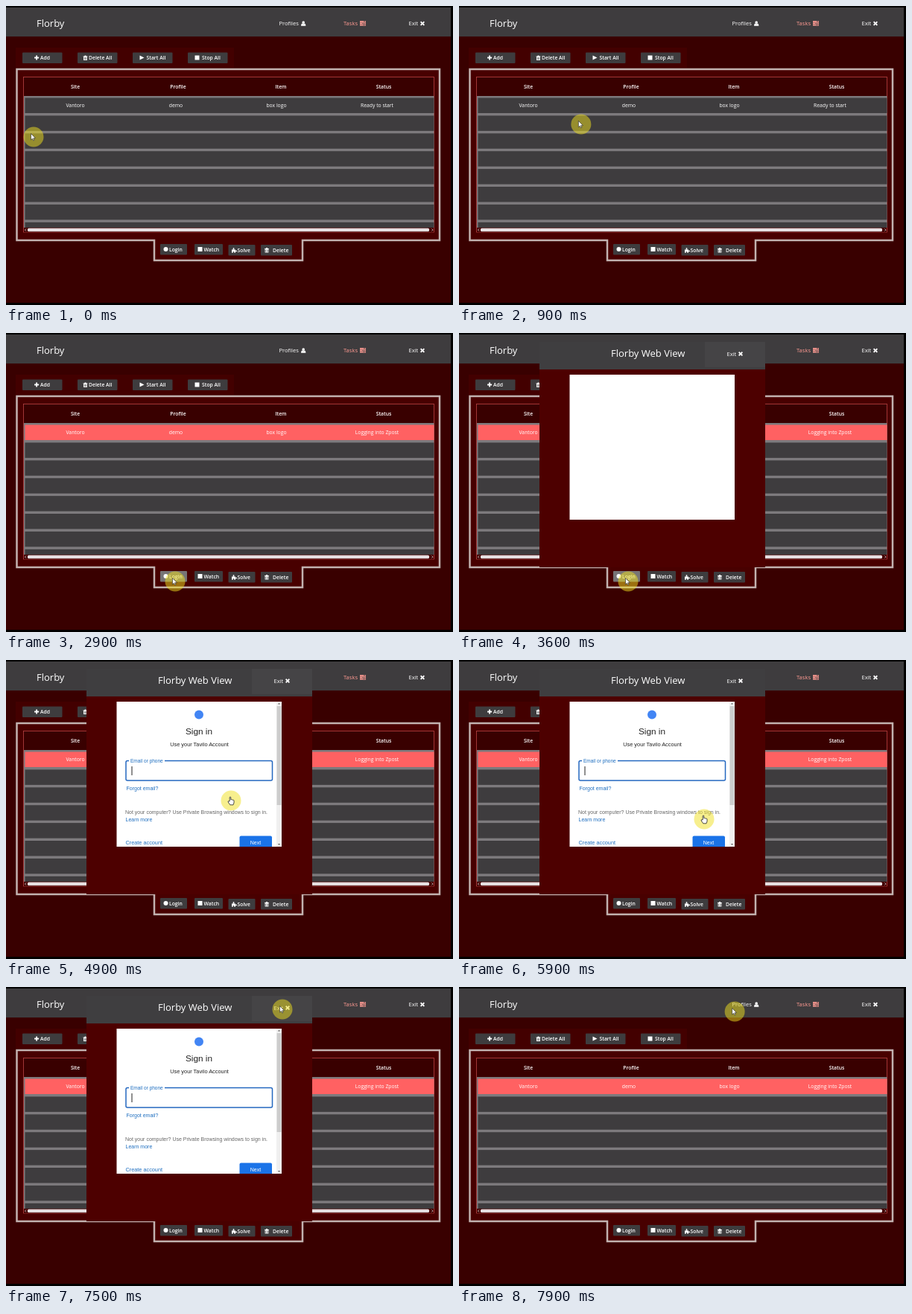
An HTML page that plays this animation: 600 px wide and 402 px high, repeating every 8000 ms.

```html
<!DOCTYPE html>
<html lang="en">
<head>
<meta charset="utf-8">
<style>
html, body { margin: 0; width: 100%; height: 100%; overflow: hidden; background: #000; }
svg { display: block; width: 600px; height: 402px; }
text { font: 6.8px "Open Sans", "Noto Sans", sans-serif; fill: #fff; }
.bold { font-weight: 600; }
.nav { font-size: 7.6px; font-weight: 500; }
.title { font-size: 13px; font-weight: 500; }
.mid { text-anchor: middle; }
#page text { font: 7px "Liberation Sans", Arial, sans-serif; fill: #1f6fc0; }
#page .ink { fill: #222; }
</style>
</head>
<body>
<svg id="stage" viewBox="0 0 600 402">
  <defs>
    <path id="plus" d="M2.2 0h1.8v2.1h2.1v1.8H4V6H2.2V3.9H.1V2.1h2.1z"/>
    <path id="cross" d="M1.3 0 3 1.7 4.7 0 6 1.3 4.3 3 6 4.7 4.7 6 3 4.3 1.3 6 0 4.7 1.7 3 0 1.3z"/>
    <path id="trash" fill-rule="evenodd" d="M0 1h1.7L2.2 0h1.6l.5 1H6v.8h-.6V6.5H.6V1.8H0zM1.5 2.5v3.2h.5V2.5zm1.3 0v3.2h.5V2.5zm1.3 0v3.2h.5V2.5z"/>
    <path id="play" d="M0 0 6 3 0 6z"/>
    <path id="square" d="M0 0h6v6H0z"/>
    <path id="dot" d="M0 3a3 3 0 0 1 6 0a3 3 0 0 1-6 0"/>
    <path id="user" d="M1.4 2a1.8 1.8 0 1 1 3.6 0a1.8 2 0 1 1-3.6 0M0 6.8Q0 3.8 1.4 3.6Q3.2 5 5 3.6Q6.4 3.8 6.4 6.8z"/>
    <path id="list" fill-rule="evenodd" d="M0 0h8v1.8H0zM0 2.3h8v1.8H0zM0 4.6h8v1.8H0zM5 .6v.6h2.3V.6zM3 2.9v.6h4.3v-.6zM4 5.2v.6h3.3v-.6z"/>
    <path id="puzzle" d="M0 2.5h1.8Q1 0 2.5 0T3.2 2.5H5V4q2-1 2 .4T5 5v1.7H3.3Q3.6 5 2.5 5T1.8 6.7H0z"/>
  </defs>
  <g id="app"></g>
  <g id="popup">
    <path fill="#4d0000" d="M108 12h303v303H108z"/>
    <path fill="#3f3e40" d="M108 12h303v37H108z"/>
    <path id="exitHover" fill="#454446" d="M330 12h81v34h-81z"/>
    <text class="title" x="204" y="32">Florby Web View</text>
    <text class="nav" x="359.5" y="31">Exit</text>
    <use href="#cross" fill="#fff" x="375" y="25"/>
    <path fill="#fff" d="M148.500 56h221.500v195H148.500z"/>
    <g id="page">
      <circle cx="259" cy="73.500" r="6" fill="#4285f4"/>
      <text class="ink mid" x="259" y="100" style="font-size:11.8px">Sign in</text>
      <text class="ink mid" x="259.500" y="115.500" style="font-size:7.4px">Use your Tavilo Account</text>
      <rect x="161" y="135.500" width="196.500" height="26.500" rx="2" fill="none" stroke="#2468c0" stroke-width="1.500"/>
      <path fill="#fff" d="M165 133h48v5h-48z"/>
      <text x="167" y="137.500" style="font-size:6.5px">Email or phone</text>
      <path fill="#222" d="M168.500 143h1v12h-1z"/>
      <text x="161.500" y="174.500">Forgot email?</text>
      <text x="160" y="206.500" style="fill:#666">Not your computer? Use Private Browsing windows to sign in.</text>
      <text x="160.500" y="216.500">Learn more</text>
      <text x="160.500" y="247.500" style="font-size:7.3px">Create account</text>
      <path fill="#1a73e8" d="M313.500 251v-12.500q0-2 2-2h39.500q2 0 2 2V251z"/>
      <text class="mid" x="335" y="247.500" style="fill:#fff">Next</text>
      <path fill="#f0f0f0" d="M363 56h7v195h-7z"/>
      <path fill="#cdcdcd" d="M363.500 62h6v133h-6z"/>
      <path fill="#666" d="M365 59.500l1.500-2 1.500 2zM365 247l1.500 2 1.500-2z"/>
    </g>
  </g>
  <g id="pointer">
    <circle r="13.500" fill="#efdf1e" fill-opacity=".5"/>
    <path id="arrow" fill="#fff" stroke="#222" stroke-width=".6" d="M-3.500-4.500V4l2-1.800L-.2 5 1 4.400-.2 1.700h2.700z"/>
    <path id="hand" fill="#fff" stroke="#222" stroke-width=".8" stroke-linejoin="round" d="M-1.800 1V-4.500q.8-1.200 1.600 0V-1.200q.9-.6 1.500.2.900-.5 1.500.3 1-.3 1.200.7V3L3 5.800h-4.200L-3.800 2q-.4-1.500.6-1.300z"/>
  </g>
</svg>
<script>
const $ = id => document.getElementById(id);
const GREY = '#3e3c3e';
const box = (x, y, w, h, fill, extra = '') =>
  `<rect x="${x}" y="${y}" width="${w}" height="${h}" fill="${fill}" ${extra}/>`;
const label = (x, y, text, cls = '', extra = '') =>
  `<text x="${x}" y="${y}" class="${cls}" ${extra}>${text}</text>`;
const icon = (name, x, y, fill = '#fff') => `<use href="#${name}" x="${x}" y="${y}" fill="${fill}"/>`;
const button = (x, y, w, name, iconX, textX, text, id = '') =>
  box(x, y, w, 14.5, GREY, `rx="1" id="${id}"`) + icon(name, iconX, y + 4) + label(textX, y + 9.8, text, 'bold');

function drawApp() {
  let s = box(0, 2, 597, 397, '#390000') + box(0, 2, 597, 39, GREY);
  s += label(41, 28, 'Florby', 'title') + label(366.5, 26, 'Profiles', 'nav') + icon('user', 396, 20);
  s += label(453, 26, 'Tasks', 'nav', 'style="fill:#ff9a92"') + icon('list', 475, 20, '#ff9a92');
  s += label(540.5, 26, 'Exit', 'nav') + icon('cross', 556, 20.5);

  s += box(13, 56, 293, 27, '#430000');
  s += button(22, 62.5, 53.5, 'plus', 38, 46, 'Add');
  s += button(96, 62.5, 53.5, 'trash', 103.5, 111, 'Delete All');
  s += button(170, 62.5, 53.5, 'play', 179.5, 188.5, 'Start All');
  s += button(244, 62.5, 53.5, 'square', 253.5, 263, 'Stop All');

  s += '<path d="M14.500 85H582V315H398V342H199V315H14.500z" fill="#480000" stroke="#c2b2b0" stroke-width="2.500"/>';
  s += box(23.5, 95.5, 551, 208.5, '#390000', 'stroke="#b84444" stroke-width=".8"');
  [['Site', 93], ['Profile', 231], ['Item', 369], ['Status', 507]]
    .forEach(([text, x]) => s += label(x, 110.5, text, 'mid bold'));
  s += box(24, 121, 550.5, 177, '#7d7a7d');
  for (let i = 0; i < 8; i++)
    s += box(25.5, 123.5 + 23.9 * i, 549, i < 7 ? 20.5 : 7.2, GREY, i ? '' : 'id="row"');
  [['Vantoro', 93], ['demo', 228], ['box logo', 363]]
    .forEach(([text, x]) => s += label(x, 136, text, 'mid'));
  s += label(498, 136, '', 'mid', 'id="status"');
  s += box(24, 298, 550, 6, '#420000') + box(29, 298.8, 539, 4.4, '#e6e0e2', 'rx="1.500"');
  s += '<path d="M27 299.500l-1.500 1.600 1.500 1.600M571.500 299.500l1.500 1.600-1.500 1.600" fill="none" stroke="#ddd" stroke-width=".8"/>';

  s += button(207, 320, 36, 'dot', 211.5, 219, 'Login', 'login');
  s += button(253, 320, 38, 'square', 257.5, 265.5, 'Watch');
  s += button(298.5, 321, 36, 'puzzle', 303, 310.5, 'Solve');
  s += button(342, 321, 42, 'trash', 347, 358, 'Delete');
  $('app').innerHTML = s;
}

// Pointer stops: time, x, y
const stops = [
  [0, 37, 176], [400, 37, 176], [1400, 290, 142], [2000, 301, 141], [2600, 228, 346],
  [2800, 227, 334], [3700, 227, 334], [4500, 298, 194], [4900, 302, 189], [5500, 308, 196],
  [5900, 329, 214], [6800, 362, 191], [7200, 372, 58], [7400, 371, 30], [7600, 371, 30], [8000, 370, 33.5]
];

function pointerAt(t) {
  const i = stops.findIndex(p => p[0] > t);
  const [t0, x0, y0] = stops[i - 1], [t1, x1, y1] = stops[i];
  const u = (t - t0) / (t1 - t0), e = u * u * (3 - 2 * u);
  return [x0 + (x1 - x0) * e, y0 + (y1 - y0) * e];
}

const show = (id, on) => $(id).style.display = on ? '' : 'none';

function render(now) {
  const t = now % 8000, [x, y] = pointerAt(t);
  $('pointer').setAttribute('transform', `translate(${x} ${y})`);
  const loaded = t >= 4200 && t < 7600;
  const hand = loaded && x > 148 && x < 370 && y > 56 && y < 251;
  show('hand', hand);
  show('arrow', !hand);
  show('popup', t >= 3200 && t < 7600);
  show('page', loaded);
  show('exitHover', t < 5200 || t >= 7300);
  $('row').setAttribute('fill', t >= 1400 ? '#ff6162' : GREY);
  $('login').setAttribute('fill', t >= 2700 && t < 3900 ? '#777476' : GREY);
  $('status').textContent = t >= 2900 ? 'Logging into Zpost' : 'Ready to start';
  requestAnimationFrame(render);
}

drawApp();
requestAnimationFrame(render);
</script>
</body>
</html>
```
